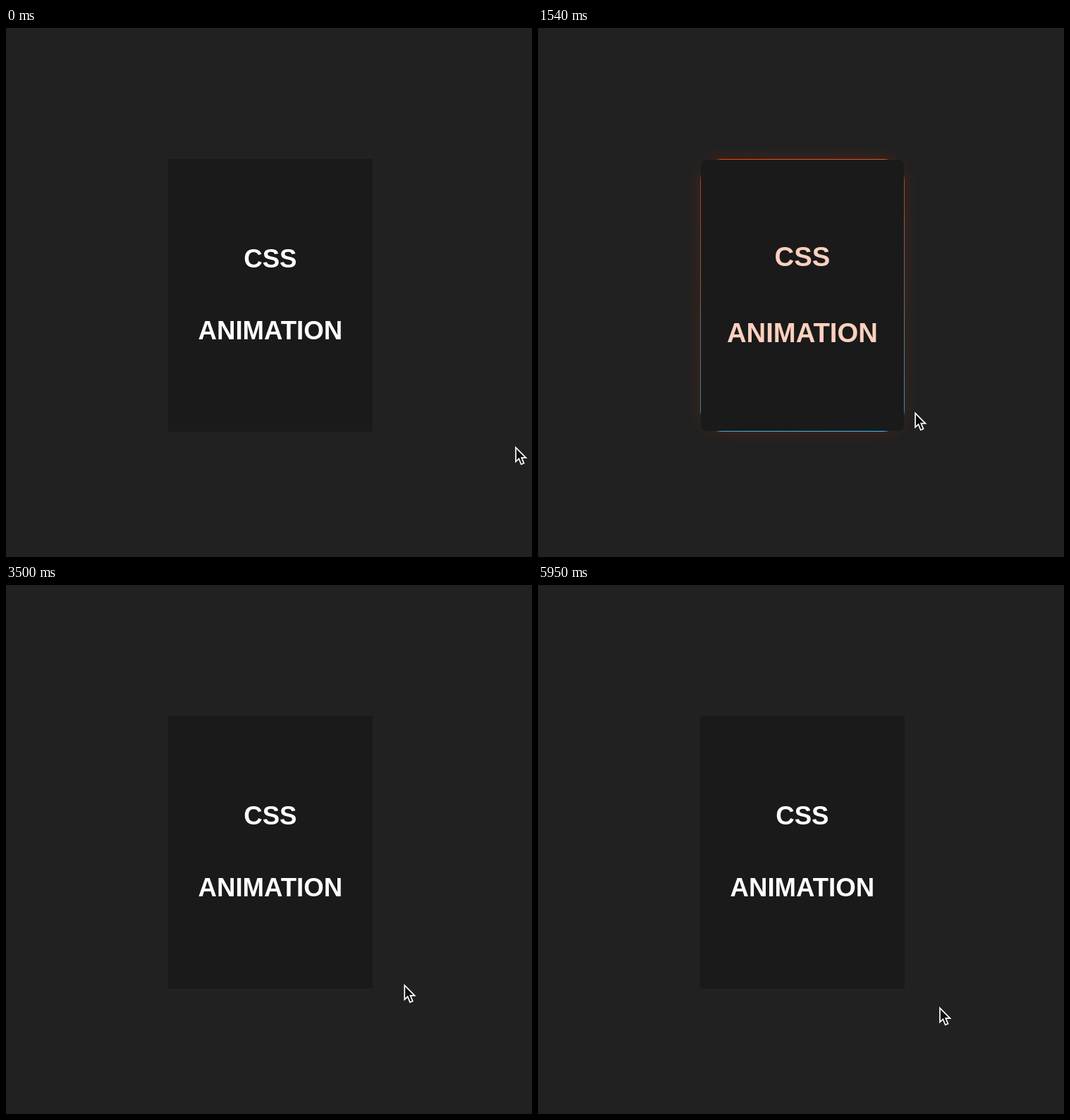
An HTML page that plays this animation: 746 by 751 pixels, repeating every 6020 ms.

```html
<!DOCTYPE html>
<html lang="en">
<head>
<meta charset="utf-8">
<title>Card hover</title>
<style>
  html, body { margin: 0; width: 100%; height: 100%; overflow: hidden; background: #212121; }
  .card {
    position: absolute; left: 230px; top: 185.5px; width: 289.7px; height: 387px;
    border-radius: 30.5px;
    background: linear-gradient(163deg, #ff4005, #2cc3f8);
    box-shadow: 0 0 calc(var(--glow) * 46px) calc(var(--glow) * 1.5px)
      rgb(255 69 0 / calc(var(--glow) * .3));
  }
  .face {
    width: 100%; height: 100%;
    display: flex; flex-direction: column; align-items: center; justify-content: center;
    background: #1a1a1a;
    border-radius: calc(var(--on) * 30.5px);
    transform: scale(calc(1 - var(--on) * .02));
    font: bold calc(36.6px * (1 + var(--on) * .2))/1.15 "Liberation Sans", Arial, sans-serif;
    color: color-mix(in srgb, #ff4500 calc(var(--on) * 100%), #fff);
  }
  .face div { margin: .83em 0; }
  #cursor { position: absolute; left: 0; top: 0; overflow: visible; }
</style>
</head>
<body>
<div class="card"><div class="face"><div>CSS</div><div>ANIMATION</div></div></div>
<svg id="cursor" width="20" height="30">
  <path d="M1 2.6V22.6L5.4 18.5 8.7 26.5 12.5 24.9 9.2 17.1H15.4Z" fill="#0c0c0c" stroke="#fff" stroke-width="1.7"/>
</svg>
<script>
const LOOP = 6020, STEP = 70;
const hovers = [[420, 1450], [2175, 3230], [4305, 5480]];

// Cursor tip: time, x, y
const path = [
  [0, 722, 593], [140, 668, 572], [280, 590, 555], [420, 518, 530], [630, 482, 506],
  [1190, 476, 498], [1330, 492, 512], [1450, 519, 534], [1820, 581, 576], [1960, 581, 576],
  [2170, 495, 522], [2450, 484, 514], [2800, 484, 514], [3080, 498, 527], [3230, 519, 542],
  [3570, 576, 572], [3850, 576, 572], [4300, 508, 544], [4340, 503, 542], [4620, 484, 533],
  [5040, 485, 536], [5250, 490, 540], [5480, 519, 560], [5740, 555, 585], [5950, 569, 598]
];

// CSS "ease": cubic-bezier(.25, .1, .25, 1)
function ease(x) {
  if (x <= 0) return 0;
  if (x >= 1) return 1;
  const bezier = (a, b, s) => 3 * a * s * (1 - s) ** 2 + 3 * b * s * s * (1 - s) + s ** 3;
  let lo = 0, hi = 1;
  for (let i = 0; i < 20; i++) {
    const mid = (lo + hi) / 2;
    if (bezier(.25, .25, mid) < x) lo = mid; else hi = mid;
  }
  return bezier(.1, 1, lo);
}

const hover = (t, duration) => hovers.reduce(
  (sum, [enter, leave]) => sum + ease((t - enter) / duration) - ease((t - leave) / duration), 0);

function tip(t) {
  const i = path.findIndex(point => point[0] > t);
  if (i < 0) return path.at(-1).slice(1);
  const [t0, x0, y0] = path[i - 1], [t1, x1, y1] = path[i];
  const k = (t - t0) / (t1 - t0);
  return [x0 + (x1 - x0) * k, y0 + (y1 - y0) * k];
}

const root = document.documentElement.style;
const cursor = document.getElementById("cursor").style;

function draw(now) {
  const t = Math.floor(now % LOOP / STEP) * STEP;
  const [x, y] = tip(t);
  root.setProperty("--on", hover(t, 200).toFixed(4));
  root.setProperty("--glow", hover(t, 300).toFixed(4));
  cursor.transform = `translate(${x}px, ${y}px)`;
}

const start = performance.now();
function tick() {
  draw(performance.now() - start);
  requestAnimationFrame(tick);
}
tick();
</script>
</body>
</html>
```
